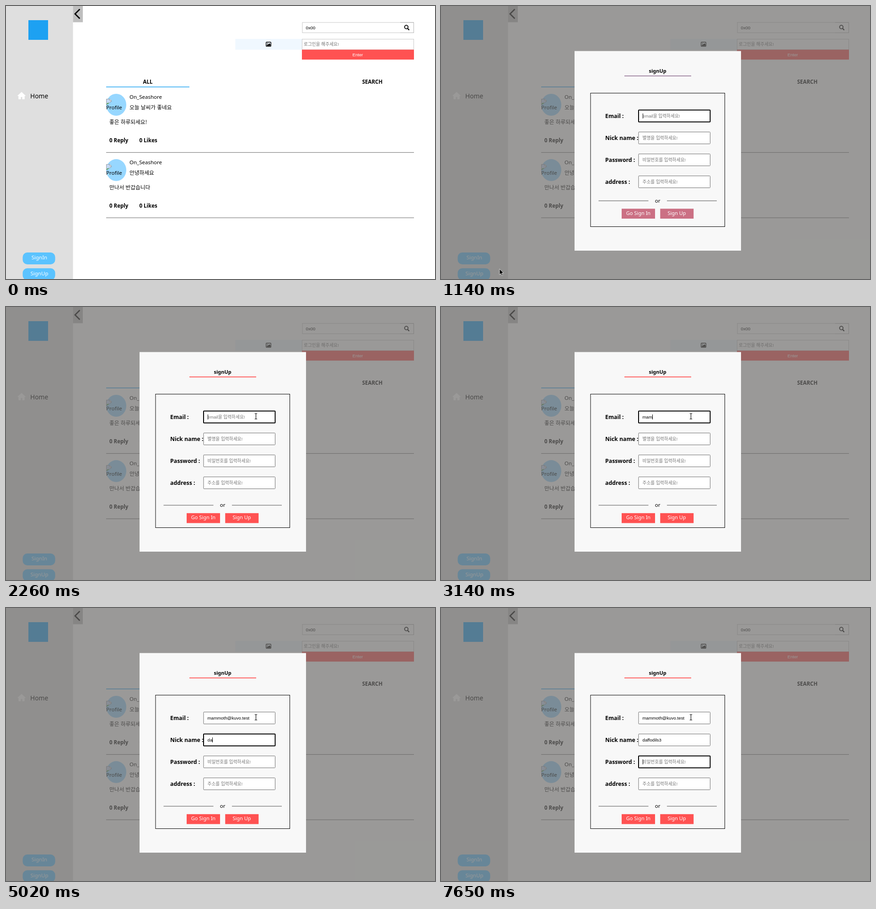
An HTML page that plays this animation: 938x597 px, repeating every 8 s.

```html
<!DOCTYPE html>
<html lang="ko">
<head>
<meta charset="utf-8">
<style>
  html, body { margin: 0; width: 100%; height: 100%; overflow: hidden; background: #fff; }
  svg { display: block; }
  text { font: 11.5px "Noto Sans", "Noto Sans CJK KR", sans-serif; white-space: pre; }
  .bold { font-weight: 600; }
  .ko { font: 11.7px "Noto Sans CJK KR", "Noto Sans", sans-serif; }
  .title { font-weight: 500; }
  .field { font: 9.7px "Liberation Sans", "Noto Sans CJK KR", sans-serif; }
  .hint { fill: #757575; }
  .label { font-size: 12.3px; font-weight: 600; }
  .mid { text-anchor: middle; }
  .white { fill: #fff; }
</style>
</head>
<body>
<svg id="stage" width="938" height="597" viewBox="0 0 938 597"></svg>
<script>
const LOOP = 8000;
const EMAIL = 'mammoth@kuvo.test', NICK = 'daffodils3';
const RED = [255, 82, 82];

const rect = (x, y, w, h, attrs) => `<rect x="${x}" y="${y}" width="${w}" height="${h}" ${attrs}/>`;
const text = (x, y, str, cls = '', attrs = '') => `<text x="${x}" y="${y}" class="${cls}" ${attrs}>${str}</text>`;
const path = (d, attrs) => `<path d="${d}" ${attrs}/>`;
const stroke = (color, width) => `fill="none" stroke="${color}" stroke-width="${width}"`;

const post = (dy, title, body) => `<g transform="translate(0 ${dy})">
  <ellipse cx="241" cy="216" rx="22" ry="24" fill="#97d7ff"/>
  ${path('M219.5 203.5h7.5l3.5 3.5v2l-11 7z', 'fill="#c5d9f5" stroke="#8a8a8a" stroke-width=".8"')}
  ${path('M227 203.5v3.5h3.5', 'fill="#fff" stroke="#8a8a8a" stroke-width=".8"')}
  ${path('M220 214.5q2-4 5-2.5l-4 3.5z', 'fill="#4ba046"')}
  ${text(219, 226, 'Profile')}
  ${text(270, 203, 'On_Seashore')}
  ${text(270, 226, title, 'ko title')}
  ${text(226, 258, body, 'ko')}
  ${text(226, 298, '0 Reply', 'bold')}
  ${text(291.5, 298, '0 Likes', 'bold')}
  ${path('M219 320.3h673', stroke('#858585', 1.3))}</g>`;

const page = [
  rect(0, 0, 146.5, 597, 'fill="#dfdfdf"'),
  rect(146.5, 0, 21.5, 35.5, 'fill="#bfbfbf"'),
  path('M161.3 7L151 17.3L161.3 27.6', stroke('#000', 2.8)),
  rect(49, 31, 43, 43, 'fill="#1da1f2"'),
  path('M34 188.5l8.5 7.7h-2.3v7.3h-4.2v-5h-4v5h-4.2v-7.3h-2.3z', 'fill="#fff" stroke="#fff" stroke-linejoin="round"'),
  text(53, 202, 'Home', '', 'style="font-size:13.8px"'),
  rect(36.5, 539, 71, 26, 'rx="10" fill="#5bc3ff"'),
  text(73, 554, 'SignIn', 'mid white'),
  rect(36.5, 573.5, 71, 26, 'rx="10" id="signUp"'),
  text(73, 589, 'SignUp', 'mid white'),
  rect(648, 36, 243.5, 22.5, stroke('#c8c8c8', 1)),
  path('M862 36H891.5V58.5H862', stroke('#b5b5b5', 1)),
  text(655.5, 51, '0x00', 'field'),
  '<circle cx="875.3" cy="46" r="3.8" fill="none" stroke="#000" stroke-width="1.8"/>',
  path('M878 49l3.6 3.6', stroke('#000', 2.2)),
  rect(501.5, 72, 145.5, 23.5, 'fill="#f0f8ff"'),
  rect(568.7, 79, 10.6, 9.3, 'rx="1.3" ' + stroke('#000', 1.4)),
  path('M570.2 87v-1.5l2-2 1 1 2.8-3.2 2.2 3v2.7z', ''),
  '<circle cx="571.8" cy="81.7" r="1"/>',
  rect(647.5, 72.5, 244, 23, stroke('#c8c8c8', 1)),
  text(651, 87, '로그인을 해주세요!', 'field hint'),
  rect(647, 95.5, 245, 21.7, 'fill="#ff5252"'),
  text(769, 110, 'Enter', 'field mid white'),
  text(310, 170, 'ALL', 'bold mid'),
  text(801, 170, 'SEARCH', 'bold mid'),
  path('M219 177h182', stroke('#5bbcf5', 1.8)),
  post(0, '오늘 날씨가 좋네요', '좋은 하루되세요!'),
  post(142.8, '안녕하세요', '만나서 반갑습니다'),
].join('');

const rows = [
  ['Email :', 'email을 입력하세요!'],
  ['Nick name :', '별명을 입력하세요!'],
  ['Password :', '비밀번호를 입력하세요!'],
  ['address :', '주소를 입력하세요!'],
];
const rowStep = 48;

const form = rows.map(([label], i) => {
  const y = 227.5 + i * rowStep;
  return text(359, y + 17.5, label, 'label') +
    rect(432, y, 156.5, 26, 'class="box" rx="1" fill="#fff"') +
    text(440.5, y + 16.3, '', 'field value');
}).join('');

const modal = [
  rect(0, 0, 938, 597, 'fill="rgba(109,108,106,.69)"'),
  rect(292, 98.5, 364, 436.5, 'fill="#f8f8f8"'),
  text(473.7, 145.5, 'signUp', 'bold mid', 'style="font-size:11px"'),
  path('M401 152.8h146', 'id="underline" stroke-width="1.7"'),
  rect(327, 190.5, 293.5, 292, stroke('#000', 1)),
  form,
  rect(441, 235, 1, 11, 'id="caret"'),
  '<g id="footer">',
  path('M344.5 433.6h109M494 433.6h109', stroke('#858585', 1.5)),
  text(473.7, 437, 'or', 'mid'),
  rect(395, 450.8, 73, 21.7, 'class="button"'),
  rect(479.3, 450.8, 73, 21.7, 'class="button"'),
  text(431.5, 464, 'Go Sign In', 'mid white', 'style="font-size:11px"'),
  text(515.5, 464, 'Sign Up', 'mid white', 'style="font-size:11px"'),
  '</g>',
].join('');

const pointers = path('M0 0v12.5l2.9-2.6 2 4.6 2-.9-2-4.5h3.9z', 'id="arrow" stroke="#fff" stroke-width=".8"') +
  path('M-2.7-6h1.9l.8.8.8-.8h1.9M0-5.2v10.4M-2.7 6h1.9l.8-.8.8.8h1.9', 'id="beam" ' + stroke('#000', 1.1)) +
  '<circle id="click" cx="91" cy="583" r="9.5" fill="#ffb000" fill-opacity=".8"/>';

const stage = document.getElementById('stage');
stage.innerHTML = page + `<g id="modal">${modal}</g>` + pointers;
const el = id => document.getElementById(id);
const all = cls => [...document.getElementsByClassName(cls)];
const boxes = all('box'), values = all('value'), buttons = all('button');
const show = (node, on) => node.setAttribute('visibility', on ? 'visible' : 'hidden');

// time, x, y of the pointer; each place is held until the next
const moves = [
  [130, 399, 578], [260, 335, 560], [380, 255, 553], [510, 180, 558], [640, 125, 571],
  [760, 99, 580], [890, 90, 583], [1140, 128, 575], [1260, 190, 508], [1390, 300, 400],
  [1510, 412, 312], [1640, 490, 260], [1760, 528, 240], [1880, 540, 239], [2010, 546.5, 239],
];
const emailKeys = [[2630, 1], [2880, 2], [3140, 3], [3270, 4], [3400, EMAIL.length]];
const nickKeys = [4760, 5020, 5390, 5640, 5900, 6400, 6650, 6900, 7030, 7400].map((t, i) => [t, i + 1]);
const entrance = [[1140, 0], [1260, .75], [1390, 1]];

const latest = (list, t) => list.filter(item => item[0] <= t).pop();
const typed = (word, keys, t) => word.slice(0, (latest(keys, t) || [0, 0])[1]);
const toRed = (from, p) => `rgb(${from.map((c, i) => Math.round(c + (RED[i] - c) * p))})`;
const within = (t, a, b) => t >= a && t < b;

function draw(t) {
  const move = latest(moves, t), open = t >= 1140;
  const beam = t >= 1760;
  show(el('arrow'), move && !beam);
  show(el('beam'), beam);
  if (move) el(beam ? 'beam' : 'arrow').setAttribute('transform', `translate(${move[1]} ${move[2]})`);
  show(el('click'), within(t, 1010, 1140));
  el('signUp').setAttribute('fill', within(t, 760, 1140) ? '#ff6347' : '#5bc3ff');

  el('modal').style.display = open ? '' : 'none';
  if (!open) return;

  const p = latest(entrance, t)[1];
  el('underline').setAttribute('stroke', toRed([157, 127, 158], p));
  buttons.forEach(b => b.setAttribute('fill', toRed([203, 112, 132], p)));
  el('footer').setAttribute('transform', `translate(0 ${-7.5 * (1 - p)})`);

  const focus = t < 3650 ? 0 : t < 7650 ? 1 : 2;
  const entries = [typed(EMAIL, emailKeys, t), typed(NICK, nickKeys, t), '', ''];
  entries.forEach((entry, i) => {
    values[i].textContent = entry || rows[i][1];
    values[i].classList.toggle('hint', !entry);
    boxes[i].setAttribute('stroke', i === focus ? '#000' : '#707070');
    boxes[i].setAttribute('stroke-width', i === focus ? 2 : 1);
  });
  const width = entries[focus] ? values[focus].getComputedTextLength() : 0;
  el('caret').setAttribute('x', Math.round(440.6 + width));
  el('caret').setAttribute('y', 235 + focus * rowStep);
  show(el('caret'), !within(t, 1640, 2260) && !within(t, 4260, 4760));
}

const start = performance.now();
function tick() {
  draw((performance.now() - start) % LOOP);
  requestAnimationFrame(tick);
}
tick();
</script>
</body>
</html>
```
